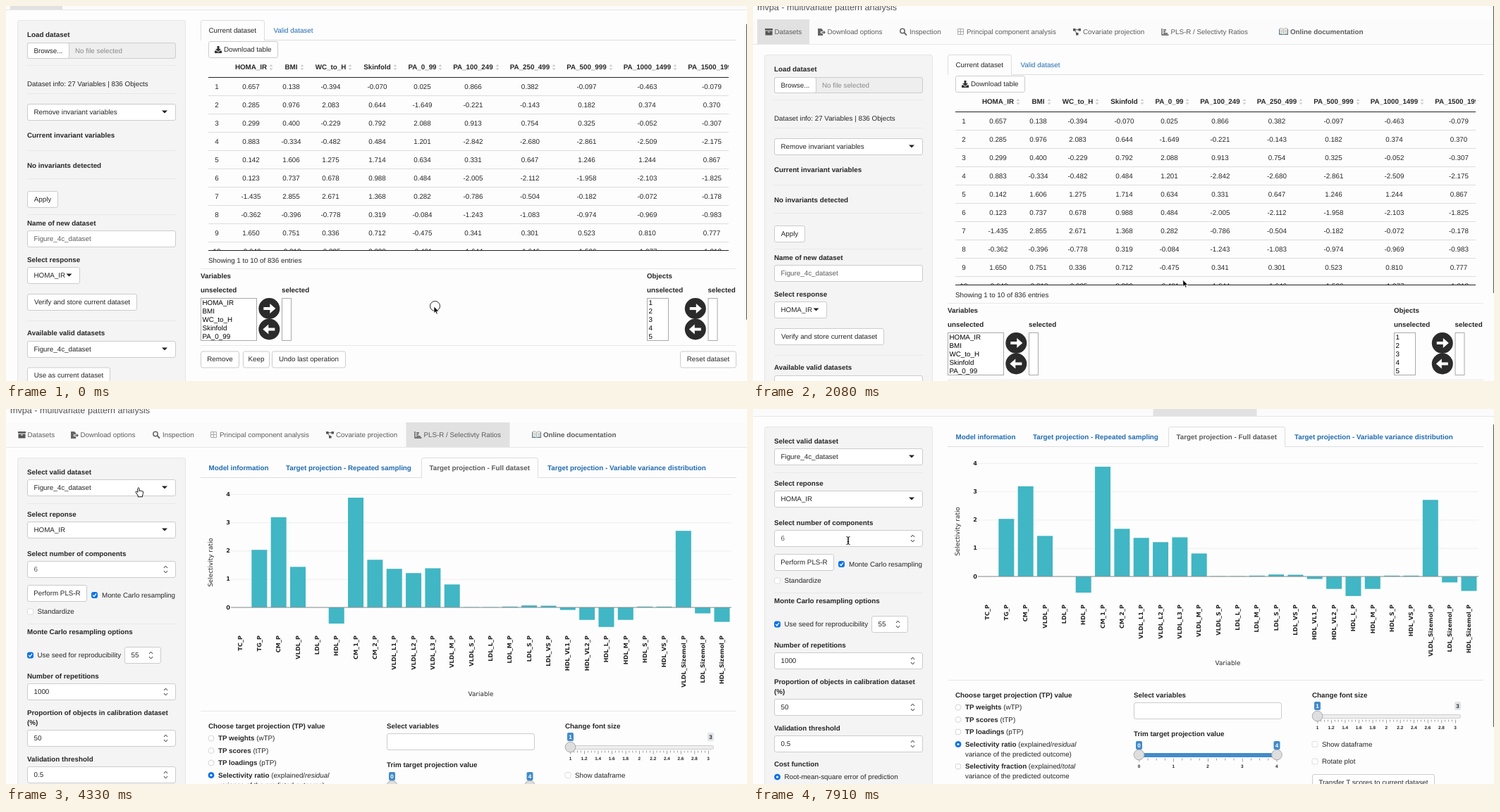
An HTML page that plays this animation: 1051 px wide and 533 px high, repeating every 8 s.

```html
<!DOCTYPE html>
<html lang="en">
<head>
<meta charset="utf-8">
<title>mvpa - multivariate pattern analysis</title>
<style>
html, body { margin: 0; width: 100%; height: 100%; overflow: hidden; background: #fdfdfd; }
svg { display: block; width: 1051px; height: 533px; }
text { font: 9.8px "Liberation Sans", Arial, sans-serif; fill: #262626; text-rendering: geometricPrecision; }
.b { font-weight: bold; }
.m { text-anchor: middle; }
.e { text-anchor: end; }
.link { fill: #1f6bb0; }
.soft { fill: #5c5c5c; }
.item { fill: #000; }
.title { font-size: 12.6px; fill: #555; }
.plot { font: 8.9px "DejaVu Sans", sans-serif; }
.tick { font: bold 8.2px "DejaVu Sans", sans-serif; }
.scale { font-size: 6.4px; font-weight: bold; }
.badge { font-size: 8px; font-weight: bold; }
.ln { fill: none; stroke: #666; }
</style>
</head>
<body>
<svg id="stage" viewBox="0 0 1051 533"></svg>
<script>
const range = n => [...Array(n).keys()];
const each = (list, fn) => list.map(fn).join('');

// y is the vertical middle of the capitals
const text = (x, y, s, cls = '', more = '') => `<text x="${x}" y="${y + 3.2}" class="${cls}" ${more}>${s}</text>`;
const bold = (x, y, s, cls = '') => text(x, y, s, 'b ' + cls);
const fill = (x, y, w, h, color, r = 0) => `<rect x="${x}" y="${y}" width="${w}" height="${h}" rx="${r}" fill="${color}"/>`;
const box = (x, y, w, h, bg = '#fff', edge = '#ccc', r = 2.5, id = '') =>
  `<rect ${id} x="${x + .5}" y="${y + .5}" width="${w - 1}" height="${h - 1}" rx="${r}" fill="${bg}" stroke="${edge}"/>`;
const path = (d, color, more = '') => `<path d="${d}" fill="${color}" ${more}/>`;
const line = (d, color, w = 1) => path(d, 'none', `stroke="${color}" stroke-width="${w}"`);
const hline = (x, y, x2, color) => fill(x, y, x2 - x, 1, color);
const caret = (x, y) => path(`M${x - 4} ${y - 2}h8l-4 4z`, '#222');
const button = (x, y, w, s, id) => box(x, y, w, 24, '#fff', '#ccc', 2.5, id) + text(x + w / 2, y + 11.7, s, 'm');
const select = (y, s) => box(30, y, 211, 24) + text(39.5, y + 12, s) + caret(225, y + 11.5);
const number = (x, y, w, s, cls = '') => box(x, y, w, 24) + text(x + 9.5, y + 12, s, cls) +
  line(`M${x + w - 17} ${y + 10}l2.5-3 2.5 3m-5 4l2.5 3 2.5-3`, '#333');
const check = (x, y, on) => box(x - 4.5, y - 4.5, 9, 9, on ? '#0b72e7' : '#fff', on ? '#0b72e7' : '#ddd', 2) +
  (on ? line(`M${x - 2.3} ${y}l1.8 2 3-4.2`, '#fff', 1.3) : '');
const radio = (x, y, on) => `<circle cx="${x}" cy="${y}" r="4" fill="${on ? '#0b72e7' : '#fff'}" stroke="${on ? '#0b72e7' : '#d5d5d5'}"/>` +
  (on ? `<circle cx="${x}" cy="${y}" r="1.6" fill="#fff"/>` : '');
const well = fill(16, 69, 239, 600, '#f4f4f4', 3) + box(16, 69, 239, 600, 'none', '#e6e6e6', 3);
const rules = ys => each(ys, y => hline(30, y, 241, '#e9e9e9'));
const tab = (x, w) => hline(276, 97, 1036, '#ddd') +
  path(`M${x + .5} 98V72q0-2.5 2.5-2.5h${w - 6}q2.5 0 2.5 2.5V98`, '#fdfdfd', 'stroke="#ddd"');

function nav() {
  const item = (x, s) => text(x, 36.5, s, 'soft');
  return fill(0, 19, 1051, 35, '#fbfbfb') + hline(0, 54, 1051, '#e7e7e7') +
    '<rect id="active" y="19" height="35" fill="#e1e1e1"/>' +
    text(6, 2.8, 'mvpa - multivariate pattern analysis', 'title') +
    fill(17, 32, 11, 2.5, '#555') + path('M17.5 35.5h10v6h-10zM21 36.5v1h3v-1z', '#555', 'fill-rule="evenodd"') +
    item(30.5, 'Datasets') +
    path('M92 32h5l2 2v2h-3v3h3v3h-7zM97 36.8h3v-2l3 2.7-3 2.7v-2h-3z', '#666') + item(105.5, 'Download options') +
    '<circle class="ln" cx="212" cy="35.5" r="3.2" stroke-width="1.5"/>' + line('M214.5 38l3.5 3.5', '#666', 1.8) + item(222, 'Inspection') +
    line('M290.5 32.5h8v8h-8zM294.5 32v9M290 36.5h9', '#aaa') + item(303, 'Principal component analysis') +
    path('M454 32h3.5v3.5h-3.5zM461.5 32h3.5v3.5h-3.5zM458 38h3.5v3.5h-3.5z', '#555') + line('M456 33.7h7M456 34l4 6', '#555') +
    item(468, 'Covariate projection') +
    line('M580 32v9h9.5M582 34h4M582 36.5h3M582 39h6', '#555', 1.3) + item(592.5, 'PLS-R / Selectivty Ratios') +
    path('M746 33h13v8h-13z', '#4c7f9b') + path('M747 32q3-1 5.5 1 2.5-2 5.5-1v8q-3-1-5.5 .8-2.5-1.8-5.5-.8z', '#f2f2ee', 'stroke="#888" stroke-width=".6"') +
    line('M748.5 35h3M748.5 37h3M754 35h3M754 37h3M752.5 33v7.5', '#999', .7) +
    bold(762, 36.5, 'Online documentation', 'soft');
}

function datasetPage() {
  const heads = 'HOMA_IR BMI WC_to_H Skinfold PA_0_99 PA_100_249 PA_250_499 PA_500_999 PA_1000_1499 PA_1500_1999'.split(' ');
  const centers = [347.5, 404.5, 460.5, 526.5, 590.5, 662.5, 743, 823.5, 909.5, 1001];
  const sorts = [376, 420, 488, 552, 616, 697, 777, 858, 949];
  const rows = `0.657 0.138 -0.394 -0.070 0.025 0.866 0.382 -0.097 -0.463 -0.079
0.285 0.976 2.083 0.644 -1.649 -0.221 -0.143 0.182 0.374 0.370
0.299 0.400 -0.229 0.792 2.088 0.913 0.754 0.325 -0.052 -0.307
0.883 -0.334 -0.482 0.484 1.201 -2.842 -2.680 -2.861 -2.509 -2.175
0.142 1.606 1.275 1.714 0.634 0.331 0.647 1.246 1.244 0.867
0.123 0.737 0.678 0.988 0.484 -2.005 -2.112 -1.958 -2.103 -1.825
-1.435 2.855 2.671 1.368 0.282 -0.786 -0.504 -0.182 -0.072 -0.178
-0.362 -0.396 -0.778 0.319 -0.084 -1.243 -1.083 -0.974 -0.969 -0.983
1.650 0.751 0.336 0.712 -0.475 0.341 0.301 0.523 0.810 0.777
-0.640 -0.313 -0.335 0.322 -0.401 -1.644 -1.646 -1.506 -1.077 -1.212`.split('\n').map(r => r.split(' '));
  const table = each(heads, (h, i) => bold(centers[i], 136, h, 'm')) +
    each(sorts, x => path(`M${x - 2.5} 135l2.5-3.2 2.5 3.2zM${x - 2.5} 137.2l2.5 3.2 2.5-3.2z`, '#d0d0d0')) +
    each(rows, (r, i) => {
      const y = 163.5 + 26 * i;
      return text(299, y, i + 1, 'm') + each(r, (v, c) => text(centers[c], y, v, 'm')) + hline(287, 176 + 26 * i, 1025, '#ddd');
    }) + hline(287, 150, 1025, '#222');
  const arrow = (x, y, dir) => `<g transform="translate(${x} ${y}) scale(${dir} 1)"><circle r="15" fill="#2b2b2b"/>` +
    path('M-8-2H1V-7L9 0 1 7V2H-8z', '#fff') + '</g>';
  const picker = (x, w, mid, x2, title, items) => bold(x, 432.5, title) + bold(x, 452.5, 'unselected') +
    bold(x2, 452.5, 'selected') + box(x, 464, w, 61, '#fff', '#aaa', 0) + box(x2, 464, 14, 61, '#fff', '#aaa', 0) +
    each(items, (s, i) => text(x + 2.5, 470.8 + 12 * i, s, 'item')) + arrow(mid, 479, 1) + arrow(mid, 508.5, -1);

  return well + rules([133, 173, 254, 294, 345, 496]) +
    bold(30, 90, 'Load dataset') + box(30, 101, 211, 23, '#eee') + box(30, 101, 60, 23) +
    text(39.5, 112.5, 'Browse...') + text(98, 112.5, 'No file selected', '', 'style="fill:#8a8a8a"') +
    text(30, 159.5, 'Dataset info: 27 Variables | 836 Objects') + select(188, 'Remove invariant variables') +
    bold(30, 233, 'Current invariant variables') + bold(30, 276, 'No invariants detected') + button(30, 312, 44, 'Apply') +
    bold(30, 357.5, 'Name of new dataset') + box(30, 368, 211, 24) + text(39.5, 380, 'Figure_4c_dataset', 'soft') +
    bold(30, 409.5, 'Select response') + box(30, 420, 75, 24) + text(39.5, 431.7, 'HOMA_IR') + caret(89.5, 431.5) +
    button(30, 458, 156, 'Verify and store current dataset') + bold(30, 514, 'Available valid datasets') +
    select(525, 'Figure_4c_dataset') + button(30, 562.5, 118, 'Use as current dataset') +
    tab(276, 91) + text(287.5, 83.5, 'Current dataset') + text(379.5, 83.5, 'Valid dataset', 'link') +
    box(287, 99, 99, 24) + path('M299.5 106h3v4h2.5l-4 4-4-4h2.5zM296 112.5h2.5l2.5 2.5 2.5-2.5h2.5v3.5h-10z', '#333') +
    text(309, 110.5, 'Download table') +
    `<clipPath id="view"><rect x="287" y="124" width="738" height="272"/></clipPath><g clip-path="url(#view)">${table}</g>` +
    hline(287, 396, 1025, '#222') + text(287, 411, 'Showing 1 to 10 of 836 entries') + hline(276, 422, 1036, '#e8e8e8') +
    picker(276, 80, 373.3, 391, 'Variables', heads.slice(0, 5)) + picker(909, 31, 977.8, 995.5, 'Objects', [1, 2, 3, 4, 5]) +
    hline(276, 531, 1036, '#e8e8e8') + button(276, 539.5, 55, 'Remove') + button(336, 539.5, 38, 'Keep') +
    button(377, 539.5, 105, 'Undo last operation') + button(956, 539.5, 80, 'Reset dataset');
}

function chart() {
  const names = 'TC TG CM VLDL LDL HDL CM_1 CM_2 VLDL_L1 VLDL_L2 VLDL_L3 VLDL_M VLDL_S LDL_L LDL_M LDL_S LDL_VS HDL_VL1 HDL_VL2 HDL_L HDL_M HDL_S HDL_VS VLDL_Sizemol LDL_Sizemol HDL_Sizemol'.split(' ');
  const ratios = [0, 2.03, 3.18, 1.43, 0, -.57, 3.87, 1.68, 1.36, 1.21, 1.38, .81, .01, .01, .03, .07, .06, -.09, -.44, -.69, -.44, .03, .03, 2.7, -.21, -.51];
  const unit = 40.3, zero = 282;
  return each(range(5), v => hline(319, zero - v * unit, 1029, '#eee') + text(318, zero - .5 - v * unit, v, 'tick e')) +
    each(ratios, (v, i) => fill(321 + 27.34 * i, zero - Math.max(v, 0) * unit, 22, Math.abs(v) * unit, '#41b6c4')) +
    hline(319, zero - .5, 1029, '#8a8f90') +
    each(names, (n, i) => text(0, 0, n + '_P', 'tick e', `transform="translate(${331.5 + 27.34 * i} 322) rotate(-90)"`)) +
    text(0, 0, 'Selectivity ratio', 'plot m', 'transform="translate(290 218) rotate(-90)"') + text(673.5, 404.5, 'Variable', 'plot m');
}

function slider(x, y, pitch, labels, minor) {
  return each(range((labels.length - 1) * minor + 1), i => fill(x + i * pitch / minor, y + 5, .7, i % minor ? 3 : 5, '#777')) +
    each(labels, (s, i) => text(x + pitch * i, y + 15.3, s, 'scale m'));
}
const knob = (x, y) => `<circle cx="${x}" cy="${y}" r="7.3" fill="#dedede" stroke="#aaa"/>`;
const badge = (x, y, s, bg, color) => fill(x - 4.5, y - 6, 9, 12, bg, 2) + text(x, y - .3, s, 'badge m', `style="fill:${color}"`);

function modelPage() {
  const option = (y, name, rest, on) => radio(291, y, on) + text(301, y, `<tspan class="b">${name}</tspan> (${rest}`);
  const blue = '#428bca';
  return well + rules([134, 305]) +
    bold(30, 90, 'Select valid dataset') + select(100, 'Figure_4c_dataset') +
    bold(30, 150, 'Select reponse') + select(160, 'HOMA_IR') +
    bold(30, 205.5, 'Select number of components') + number(30, 216, 211, '6', 'soft') +
    button(30, 250, 85, 'Perform PLS-R', 'id="run"') + check(125.5, 264.5, true) + text(136, 264.5, 'Monte Carlo resampling') +
    check(34.5, 288, false) + text(44.5, 288, 'Standardize') + bold(30, 317, 'Monte Carlo resampling options') +
    check(34.5, 350, true) + text(44.5, 350, 'Use seed for reproducibility') + number(168, 338, 52, '55') +
    bold(30, 379.5, 'Number of repetitions') + number(30, 390, 211, '1000') +
    bold(30, 431.5, 'Proportion of objects in calibration dataset') + bold(30, 445.5, '(%)') + number(30, 456, 211, '50') +
    bold(30, 497.5, 'Validation threshold') + number(30, 508, 211, '0.5') +
    bold(30, 549, 'Cost function') + radio(34.5, 567, true) + text(44.5, 567, 'Root-mean-square error of prediction') + text(44.5, 581, '(RMSEP)') +
    tab(589, 166) + bold(287.5, 83.5, 'Model information', 'link') + bold(397, 83.5, 'Target projection - Repeated sampling', 'link') +
    bold(600.5, 83.5, 'Target projection - Full dataset', 'soft') + bold(768, 83.5, 'Target projection - Variable variance distribution', 'link') +
    chart() + hline(276, 429, 1036, '#e8e8e8') +
    bold(287, 450.5, 'Choose target projection (TP) value') +
    option(468, 'TP weights', 'wTP)') + option(485.5, 'TP scores', 'tTP)') + option(503, 'TP loadings', 'pTP)') +
    option(520.5, 'Selectivity ratio', 'explained/<tspan font-style="italic">residual</tspan>', true) +
    text(301, 534.5, 'variance of the predicted outcome)') +
    option(552, 'Selectivity fraction', 'explained/<tspan font-style="italic">total</tspan>') +
    text(301, 566, 'variance of the predicted outcome') +
    bold(540, 450.5, 'Select variables') + box(540, 461, 210, 24) + bold(540, 506, 'Trim target projection value') +
    fill(547, 533, 196, 6, blue) + slider(547.5, 535.5, 48.8, range(5), 4) + knob(547.5, 535.5) + knob(743, 535.5) +
    badge(547.5, 522, 0, blue, '#fff') + badge(743, 522, 4, blue, '#fff') +
    bold(793, 450.5, 'Change font size') + box(797, 478, 207, 6, '#eee', '#ccc', 2) +
    slider(800.5, 480.5, 19.55, range(11).map(i => +(1 + i / 5).toFixed(1)), 4) + knob(800.5, 480.5) +
    badge(800.5, 466, 1, blue, '#fff') + badge(999.5, 466, 3, '#e1e4e9', '#333') +
    check(797, 520.5, false) + text(807, 520.5, 'Show dataframe') + check(797, 545, false) + text(807, 545, 'Rotate plot') +
    button(793, 563, 174, 'Transfer T scores to current dataset');
}

const pointers = {
  arrow: path('M0 0V9.5L2.2 7.5 3.7 11 5.3 10.3 3.8 7.1H6.8z', '#000', 'stroke="#fff" stroke-width=".7"'),
  hand: path('M0 0c-1 0-1.2.8-1.2 1.5v5L-2.5 5.3c-.9-.6-2 .2-1.3 1.3l3 4.4v1.8h6.3V11c.9-1.5 1-3 1-5.2 0-1.3-1.6-1.4-1.9-.6 0-1.2-1.7-1.4-2-.5 0-1-1.4-1-1.4 0V1.5C1.2.8.9 0 0 0z', '#fff', 'stroke="#111"'),
  beam: line('M-2.5-5.5Q0-5.5 0-4V4Q0 5.5-2.5 5.5M2.5-5.5Q0-5.5 0-4V4Q0 5.5 2.5 5.5M-1.3 1.5h2.6', '#111')
};

const stage = document.getElementById('stage');
stage.innerHTML = fill(0, 0, 1051, 533, '#fdfdfd') + `<g id="nav">${nav()}</g><g id="data">${datasetPage()}</g><g id="model">${modelPage()}</g>` +
  '<rect id="bar" x="1050" width="1" fill="#555"/><circle id="ring" cx="608.5" cy="426.5" r="7" fill="none" stroke="#222"/><g id="pointer"></g>';
const [navEl, active, data, model, run, bar, ring, pointer] =
  ['nav', 'active', 'data', 'model', 'run', 'bar', 'ring', 'pointer'].map(id => document.getElementById(id));

const set = (el, attrs) => Object.entries(attrs).forEach(([k, v]) => el.setAttribute(k, v));
const show = (el, on) => set(el, { display: on ? 'inline' : 'none' });

// first step, last step, number of steps, goal, pointer on arrival
const moves = [
  [1940, 2530, 5, 634, 64, 'arrow'],
  [2680, 2830, 2, 634.5, 33.5, 'hand'],
  [3730, 4330, 5, 188, 112, 'hand'],
  [4930, 5530, 5, 176, 263, 'hand'],
  [6570, 7020, 4, 88, 223, 'hand'],
  [7320, 7910, 5, 135, 187, 'beam']
];

function pointerAt(t) {
  let x = 607, y = 427, kind = 'arrow';
  for (const [start, end, steps, gx, gy, goal] of moves) {
    if (t < start) break;
    const k = Math.min(1, (Math.floor((t - start) / (end - start) * (steps - 1) + .01) + 1) / steps);
    const ease = k * k * (3 - 2 * k);
    x += (gx - x) * ease;
    y += (gy - y) * ease;
    kind = k < 1 ? 'arrow' : goal;
  }
  return { x, y, kind };
}

// time, scroll offset
const scrolls = [[0, 49], [1490, 40], [1640, 12], [1790, -1], [1940, 0], [6130, 22], [6280, 44]];

function draw(t) {
  const scroll = scrolls.findLast(s => t >= s[0])[1];
  const second = t >= 3130;
  for (const el of [navEl, data, model]) set(el, { transform: `translate(0 ${-scroll})` });
  set(active, second ? { x: 567.5, width: 147 } : { x: 6, width: 74 });
  show(data, !second);
  show(model, second);
  set(bar, { y: -12 + .77 * scroll, height: second ? 430 : 420 });
  show(bar, t < 4030 || t >= 5830);
  show(ring, t < 150 || t >= 1050 && t < 1200);

  const p = pointerAt(t);
  const over = t >= 6280 && p.x > 30 && p.x < 115 && p.y > 206 && p.y < 230;
  set(run, { fill: over ? '#e6e6e6' : '#fff', stroke: over ? '#adadad' : '#ccc' });
  pointer.innerHTML = pointers[over ? 'hand' : p.kind];
  set(pointer, { transform: `translate(${p.x} ${p.y})` });
}

const began = performance.now();
function tick() {
  draw((performance.now() - began) % 8000);
  requestAnimationFrame(tick);
}
tick();
</script>
</body>
</html>
```
